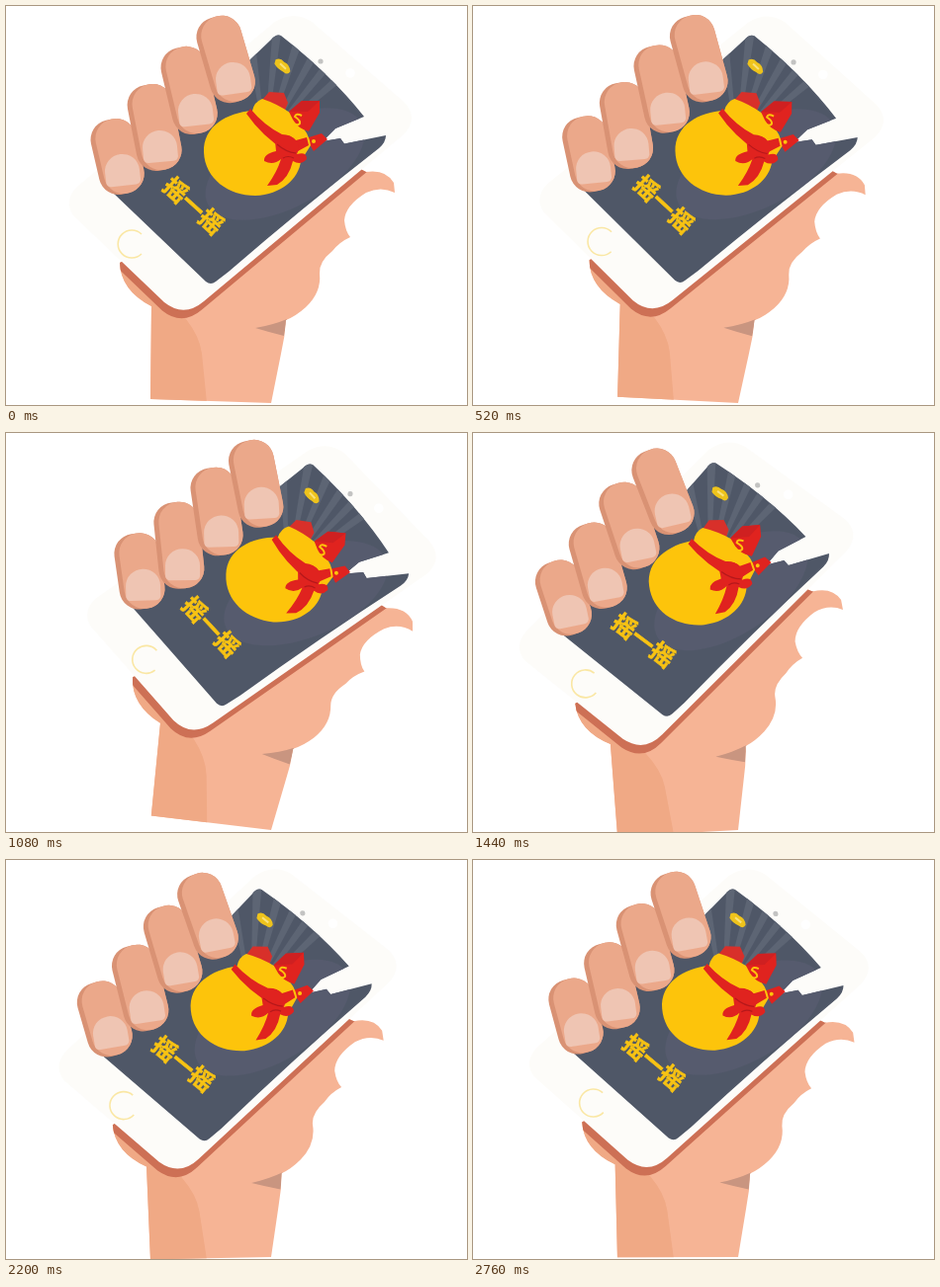
Write an HTML page that moves like this. It is 466 by 404 pixels and loops after 2.8 s.

```html
<!DOCTYPE html>
<html lang="zh">
<head>
<meta charset="utf-8">
<title>摇一摇</title>
<style>
  html, body { margin: 0; width: 100%; height: 100%; overflow: hidden; background: #fff; }
  svg { display: block; width: 466px; height: 404px; }
  text { font: 900 24px "Noto Sans CJK SC", "Noto Sans CJK", sans-serif; }
</style>
</head>
<body>
<svg viewBox="0 0 466 404">
  <defs>
    <path id="hand" d="M330 150L364 168Q384 165 392 179L393 189Q379 182 364 189Q343 202 342 217Q343 228 348 234Q337 239 330 248Q316 259 317 271Q319 290 303 305Q293 314 283 318Q282 335 278 352L268 402L146 398L147 304Q116 288 115 260Z"/>
    <path id="phone" d="M68 212L160 300Q180 316 200 299L402 130Q418 113 402 97L309 16Q291 4 272 16L72 183Q58 197 68 212Z"/>
    <path id="screen" d="M278 30Q328 69 362 112L333 124L320 137L338 134L342 139.500L384 131Q384 138 377 144Q300 204 225 269L212 279Q207 283 202 279L107 188L268 34Q273 28 278 30Z"/>
    <path id="nail" d="M-17 11V0A17.500 17 0 0 1 18 0V11Q17 15 13 15H-12Q-16 15-17 11Z"/>
    <clipPath id="inHand"><use href="#hand"/></clipPath>
    <clipPath id="inScreen"><use href="#screen"/></clipPath>
  </defs>
  <g id="shaker">
    <use href="#hand" fill="#f6b495"/>
    <g clip-path="url(#inHand)">
      <path d="M110 250L182 317Q196 335 198 352L203 402H140V304L110 290Z" fill="#f0a985"/>
      <use href="#phone" x="-2" y="8.500" fill="#cd7055"/>
      <path d="M252 326Q270 323 284 317L281 334Q265 330 252 326Z" fill="#c99580"/>
    </g>
    <use href="#phone" fill="#fdfcf9"/>
    <use href="#screen" fill="#4f5767"/>
    <g clip-path="url(#inScreen)">
      <ellipse cx="282" cy="160" rx="88" ry="44" transform="rotate(-28 282 160)" fill="#565b6e"/>
      <g id="rays" fill="#5d6574"></g>
    </g>
    <path d="M137 251A14 14 0 1 1 137 231" fill="none" stroke="#fae7a4" stroke-width="1.600"/>
    <circle cx="318" cy="56" r="2.600" fill="#c3c3c2"/>
    <circle cx="348" cy="68" r="4.800" fill="#fff"/>

    <g transform="translate(280 61) rotate(42)">
      <path d="M-10 0Q-8-5-2-4Q4-6 9-1Q10 4 4 4Q-2 6-8 4Z" fill="#eec31c"/>
      <path d="M-4 0H4" stroke="#f9e17c" stroke-width="2"/>
    </g>

    <g fill="#e0231f">
      <path d="M259 95L266 87L281 88L285 98L281 108L262 102Z" fill="#d8302a"/>
      <path d="M303 134L319 129L325 135L311 147Z"/>
      <path d="M259 94Q251 97 249 106C223 108 199 122 200 148C201 175 225 192 252 192C278 191 296 175 298 157L308 141Q306 128 297 120L287 108Q274 99 259 94Z" fill="#fdc40b"/>
      <path d="M286 107L299 96L317 96L317 108L306 127Q295 124 290 115Z"/>
      <path d="M286 107L299 96L317 96L305 107Z" fill="#cf2021"/>
      <path d="M299 111Q293 108 292 112Q298 116 297 119Q294 122 290 118" fill="none" stroke="#fdc40b" stroke-width="2"/>
      <circle cx="311" cy="137" r="2" fill="#fdc40b"/>
      <path d="M243 109L247 104Q261 121 279 130Q288 130 293 136L304 133L306 141L295 147L283 147Q259 132 243 109Z"/>
      <path d="M272 137Q281 127 291 134Q299 141 294 150Q304 147 304 155Q298 162 290 157Q286 174 274 181L264 182Q274 168 278 155Q270 162 261 157Q260 150 273 147Z"/>
      <path d="M274 140Q283 148 293 149M280 154Q285 151 291 154" fill="none" stroke="#b5181b" stroke-width="1.200"/>
    </g>

    <text transform="translate(190.500 201) rotate(42)" text-anchor="middle" dominant-baseline="central" fill="#f8c313" stroke="#f8c313" stroke-width=".6">摇一摇</text>
    <g id="fingers"></g>
  </g>
</svg>
<script>
  const byId = id => document.getElementById(id);
  const PIVOT = '268 402', STEP_MS = 40, STEPS = 70;

  // Light beams fan out from behind the bag.
  byId('rays').innerHTML = [-8, 6, 18, 29, 39, 49].map(a =>
    `<path d="M-2-35L-5-130H5L2-35Z" transform="translate(262 138) rotate(${a})"/>`).join('');

  // Each finger runs from knuckle (x1, y1) to tip (x2, y2), with a shaded left side.
  const finger = ([x1, y1, x2, y2]) => {
    const tilt = -Math.atan2(x2 - x1, y2 - y1) * 180 / Math.PI;
    const length = Math.hypot(x2 - x1, y2 - y1) + 46;
    const limb = (left, color) =>
      `<rect x="${left}" y="-22.5" width="${23 - left}" height="${length}" rx="20" fill="${color}"/>`;
    return `<g transform="translate(${x1} ${y1}) rotate(${tilt})">${limb(-23, '#d99274')}${limb(-18, '#eba88a')}</g>` +
      `<use href="#nail" fill="#efc5b3" transform="translate(${x2 + 1} ${y2}) rotate(${tilt / 2})"/>`;
  };
  byId('fingers').innerHTML = [
    [109, 137, 116, 167], [146, 102, 154, 143], [180, 64, 190, 106], [216, 33, 228, 74]
  ].map(finger).join('');

  // Slow lift, five fast swings between 9 and -11 degrees, slow return.
  function angleAt(step) {
    if (step < 9) return step;
    if (step > 59) return -11 + 0.9 * (step - 59);
    return 2 * Math.abs((step - 9) % 20 - 10) - 11;
  }

  function draw() {
    const step = Math.floor(performance.now() / STEP_MS) % STEPS;
    byId('shaker').setAttribute('transform', `rotate(${angleAt(step)} ${PIVOT})`);
    requestAnimationFrame(draw);
  }
  draw();
</script>
</body>
</html>
```
